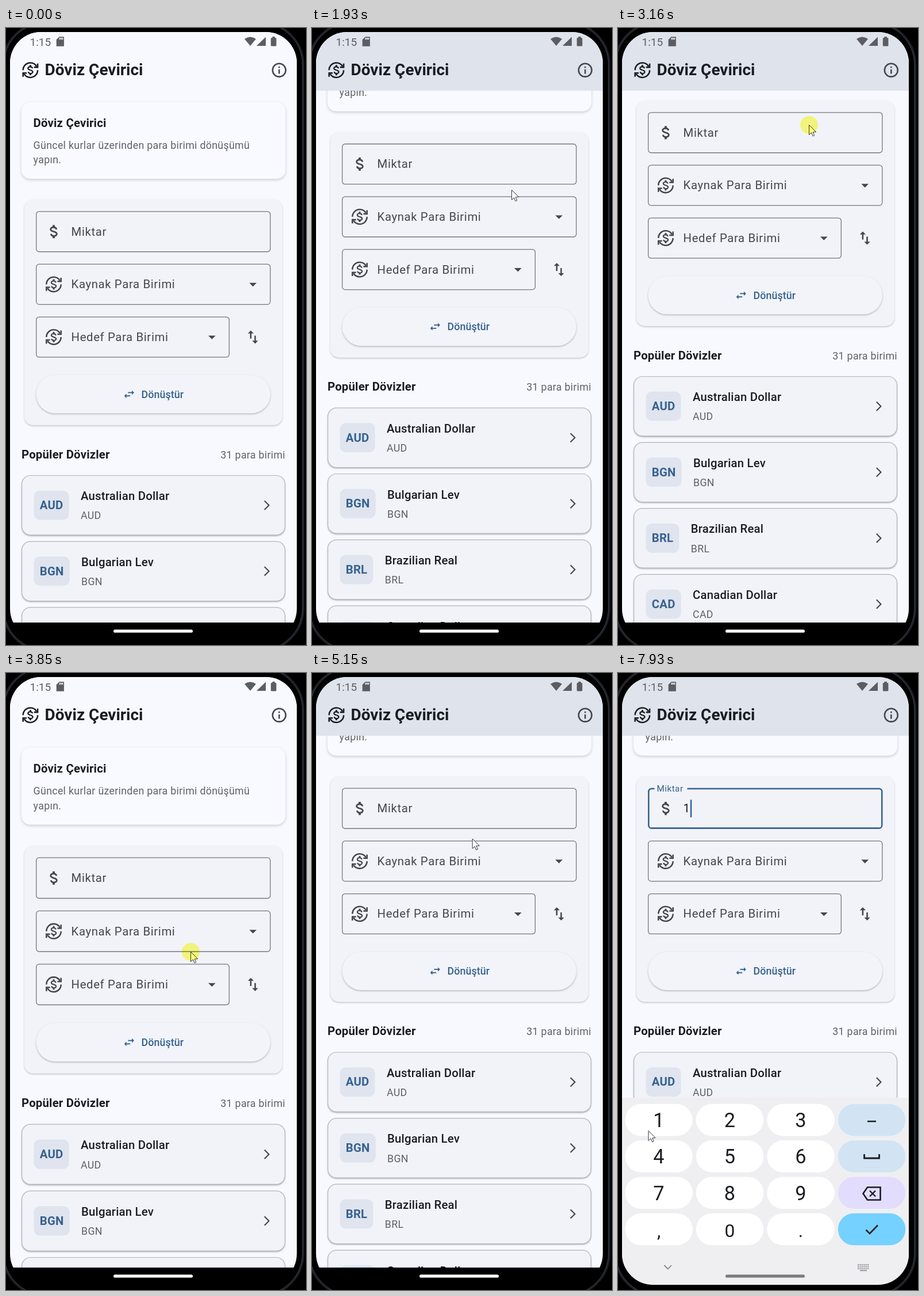
These frames come from a looping animation (522x1072 px, 8000 ms). An HTML page with a canvas:

```html
<!DOCTYPE html>
<html lang="tr">
<head>
<meta charset="utf-8">
<title>Döviz Çevirici</title>
<style>
html, body { margin: 0; width: 100%; height: 100%; overflow: hidden; background: #000; }
canvas { display: block; width: 522px; height: 1072px; }
</style>
</head>
<body>
<canvas id="stage"></canvas>
<script>
const W = 522, H = 1072, LOOP = 8000, DP = 1.2707;
const canvas = document.getElementById('stage');
const ctx = canvas.getContext('2d');
const ratio = window.devicePixelRatio || 1;
canvas.width = W * ratio;
canvas.height = H * ratio;

const INK = '#191c20', SOFT = '#43474e', GREY = '#5f6166', PRIMARY = '#36618e';
const SURFACE = '#f8f9ff', PANEL = '#f1f3f8', BADGE = '#dfe4ee';

const CURRENCIES = [
  ['AUD', 'Australian Dollar'], ['BGN', 'Bulgarian Lev'],
  ['BRL', 'Brazilian Real'], ['CAD', 'Canadian Dollar']
];

const lerp = (a, b, p) => a + (b - a) * p;
const easeOut = p => 1 - (1 - p) ** 3;
const progress = (t, a, b) => easeOut(Math.min(1, Math.max(0, (t - a) / (b - a))));

// Rests at a value, then eases through moves of [begin, end, ...value].
const follow = (rest, ...moves) => t => moves.reduce((at, [begin, end, ...to]) =>
  at.map((v, i) => lerp(v, to[i], progress(t, begin, end))), rest);

const pointerAt = follow([32, 719],
  [450, 950, 410, 216], [950, 1200, 362, 430], [1250, 1700, 347, 281],
  [2070, 2400, 380, 355], [2400, 2880, 335, 203], [2900, 3160, 332, 168],
  [3330, 3850, 321, 484], [4430, 4950, 279, 288], [5150, 5590, 230, 217],
  [6650, 7060, 150, 560], [7240, 7930, 52.5, 795]);
const scrollAt = follow([0], [1270, 2110, 118.5], [2900, 3160, 172], [3330, 3640, 0], [4430, 5110, 118.5]);
const stretchAt = follow([0], [3640, 3850, .0098], [4000, 4200, 0]);
const tintAt = follow([0], [1250, 1450, 1], [3600, 3780, 0], [4440, 4640, 1]);

const TYPED = 7700;
const isPressed = t => t > 1200 && t < 1700 || t > 2860 && t < 4050 || t > 4430 && t < 4980 || t > 5560 && t < 6330;
const hasCaret = t => t > TYPED || t > 6070 && t < 7560 && (t - 6070) % 1000 < 570;

function mix(a, b, p) {
  const rgb = c => [1, 3, 5].map(i => parseInt(c.slice(i, i + 2), 16));
  const to = rgb(b);
  return `rgb(${rgb(a).map((v, i) => Math.round(lerp(v, to[i], p)))})`;
}

function line(points, color, width) {
  ctx.beginPath();
  points.forEach(([x, y]) => ctx.lineTo(x, y));
  ctx.strokeStyle = color;
  ctx.lineWidth = width;
  ctx.stroke();
}

function polygon(points, fill) {
  ctx.beginPath();
  points.forEach(([x, y]) => ctx.lineTo(x, y));
  ctx.closePath();
  ctx.fillStyle = fill;
  ctx.fill();
}

function box(x, y, w, h, r, { fill, stroke, width = 1.3, shadow, blur = 3, drop = 1.5 }) {
  ctx.beginPath();
  ctx.roundRect(x, y, w, h, r);
  if (fill) {
    ctx.save();
    if (shadow) {
      ctx.shadowColor = `rgba(0,0,0,${shadow})`;
      ctx.shadowBlur = blur * ratio;
      ctx.shadowOffsetY = drop * ratio;
    }
    ctx.fillStyle = fill;
    ctx.fill();
    ctx.restore();
  }
  if (stroke) {
    ctx.strokeStyle = stroke;
    ctx.lineWidth = width;
    ctx.stroke();
  }
}

// Text is centred on its capital height; sizes and spacing are in dp.
function text(s, x, y, size, { color = INK, weight = 400, space = 0, align = 'left' } = {}) {
  ctx.font = `${weight} ${size * DP}px Roboto, sans-serif`;
  ctx.letterSpacing = `${space * DP}px`;
  ctx.textAlign = align;
  ctx.fillStyle = color;
  ctx.fillText(s, x, y + size * DP * .355);
}

// Draws a shape and its half-turn copy.
function twice(shape) {
  for (let i = 0; i < 2; i++) {
    shape();
    ctx.rotate(Math.PI);
  }
}

// Icons are drawn around the origin on a 24-unit grid.
const ICONS = {
  dollar(color) {
    twice(() => {
      ctx.fillRect(-1.5, -9, 3, 3);
      ctx.beginPath();
      ctx.moveTo(3.7, -3);
      ctx.bezierCurveTo(3.3, -7, -4.2, -6.8, -4.2, -3.2);
      ctx.bezierCurveTo(-4.2, -1.1, -2, -.6, 0, 0);
      ctx.lineWidth = 2.2;
      ctx.stroke();
    });
  },
  exchange(color) {
    twice(() => {
      ctx.beginPath();
      ctx.arc(0, 0, 10, Math.PI, -.55);
      ctx.lineWidth = 2;
      ctx.stroke();
      line([[10, -9], [10, -4], [5, -4]], color, 2);
    });
    ctx.scale(.78, .78);
    ICONS.dollar(color);
  },
  swap(color) {
    twice(() => {
      ctx.fillRect(-4, -5.5, 2, 7.5);
      polygon([[-7, -5], [-3, -9], [1, -5]], color);
    });
  },
  swapAcross(color) {
    ctx.rotate(-Math.PI / 2);
    ICONS.swap(color);
  },
  drop(color) {
    polygon([[-5, -2], [0, 3], [5, -2]], color);
  },
  info(color) {
    ctx.beginPath();
    ctx.arc(0, 0, 9, 0, Math.PI * 2);
    ctx.lineWidth = 2;
    ctx.stroke();
    ctx.fillRect(-1, -5, 2, 2);
    ctx.fillRect(-1, -1, 2, 6);
  },
  chevron(color) {
    line([[-4.9, -9.1], [4.2, 0], [-4.9, 9.1]], color, 2.5);
  },
  sd(color) {
    polygon([[-2, -10], [8, -10], [8, 10], [-8, 10], [-8, -4]], color);
    ctx.fillStyle = SURFACE;
    for (let i = 0; i < 3; i++) ctx.fillRect(-2 + i * 3, -8, 2, 4);
  }
};

function drawIcon(name, cx, cy, color = SOFT, size = 24) {
  ctx.save();
  ctx.translate(cx, cy);
  ctx.scale(size * DP / 24, size * DP / 24);
  ctx.fillStyle = ctx.strokeStyle = color;
  ICONS[name](color);
  ctx.restore();
}

function drawBezel() {
  ctx.fillStyle = '#000';
  ctx.fillRect(0, 0, W, H);
  box(-5, -10, 522, 1092, 74, { stroke: '#1d2026', width: 4 });
  box(-4, -9, 520, 1090, 73, { stroke: '#363a42', width: 1 });
}

function outline(y, w, color, width) {
  box(52 + width / 2, y + width / 2, w - width, 71.2 - width, 5, { stroke: color, width });
}

function field(row, w, glyph, label) {
  const y = 318.2 + row * 91.6;
  outline(y, w, '#73777f', 1.3);
  drawIcon(glyph, 83, y + 35.6);
  if (label) text(label, 113.5, y + 35.25, 16, { color: SOFT, space: .5 });
}

function drawAmount(t) {
  const y = 318.2, p = progress(t, 6200, 6390);
  if (!p) {
    field(0, 408.5, 'dollar', 'Miktar');
  } else {
    outline(y, 408.5, mix('#73777f', PRIMARY, p), lerp(1.3, 2.54, p));
    ctx.fillStyle = PANEL;
    ctx.fillRect(lerp(91, 63.5, p), y - 2, 57 * p, 6);
    drawIcon('dollar', 83, y + 35.6);
    text('Miktar', lerp(113.5, 67.5, p), lerp(y + 35.25, y + 1, p), lerp(16, 12, p),
      { color: mix(SOFT, PRIMARY, p), space: lerp(.5, .375, p) });
    const typed = t >= TYPED;
    ctx.globalAlpha = typed ? 1 : p;
    text(typed ? '1' : '0.00', 113.5, y + 35.25, 16, { color: typed ? INK : SOFT, space: .5 });
    ctx.globalAlpha = 1;
  }
  if (hasCaret(t)) {
    ctx.fillStyle = PRIMARY;
    ctx.fillRect(t >= TYPED ? 125.8 : 113.5, y + 20.5, 2.5, 30.5);
  }
}

function drawForm(t) {
  box(32, 298, 449, 392, 15, { fill: PANEL, shadow: .22 });
  drawAmount(t);
  field(1, 408.5, 'exchange', 'Kaynak Para Birimi');
  field(2, 337, 'exchange', 'Hedef Para Birimi');
  drawIcon('drop', 429.7, 445.4);
  drawIcon('drop', 358.3, 537);
  drawIcon('swap', 429.7, 537);
  box(52.5, 603, 407.5, 66.5, 33, { fill: '#f2f4fa', shadow: .25 });
  drawIcon('swapAcross', 214.3, 636.3, PRIMARY, 18);
  text('Dönüştür', 235.5, 636.2, 14, { color: PRIMARY, weight: 500, space: .1 });
}

function drawCurrency([code, name], y) {
  const strong = { color: PRIMARY, weight: 700, space: .15 };
  box(27.6, y, 457.8, 103.4, 15, { fill: PANEL, stroke: '#b4b6bb', width: 1.2, shadow: .35 });
  ctx.font = `700 ${16 * DP}px Roboto, sans-serif`;
  ctx.letterSpacing = `${.15 * DP}px`;
  const w = ctx.measureText(code).width + 16 * DP;
  box(48.6, y + 26.2, w, 50.8, 10, { fill: BADGE });
  text(code, 48.6 + 8 * DP, y + 51.2, 16, strong);
  const x = 48.6 + w + 16 * DP;
  text(name, x, y + 35.55, 16, { weight: 500, space: .15 });
  text(code, x, y + 69.6, 14, { color: GREY, space: .25 });
  drawIcon('chevron', 453.9, y + 51.7, SOFT, 16);
}

function drawBody(t) {
  const note = { color: GREY, space: .25 }, heading = { weight: 700, space: .15 };
  ctx.save();
  ctx.beginPath();
  ctx.rect(7, 109, 499, 924);
  ctx.clip();
  ctx.translate(0, 109);
  ctx.scale(1, 1 + stretchAt(t)[0]);
  ctx.translate(0, -109 - scrollAt(t)[0]);
  box(27, 129, 459, 133, 15, { fill: '#f9faff', shadow: .18, blur: 5, drop: 2 });
  text('Döviz Çevirici', 47.6, 164.8, 16, heading);
  text('Güncel kurlar üzerinden para birimi dönüşümü', 47.6, 203.7, 14, note);
  text('yapın.', 47.6, 229.1, 14, note);
  drawForm(t);
  text('Popüler Dövizler', 27, 740.6, 16, heading);
  text('31 para birimi', 486, 741.3, 14, { ...note, align: 'right' });
  CURRENCIES.forEach((c, i) => drawCurrency(c, 777.5 + i * 114.6));
  ctx.restore();
}

function drawHeader(t) {
  const status = '#5b5d62';
  ctx.fillStyle = mix(SURFACE, '#dfe3ec', tintAt(t)[0]);
  ctx.fillRect(7, 7, 499, 102);
  text('1:15', 41.5, 24.3, 15, { color: status });
  drawIcon('sd', 94.3, 23.5, status, 15.6);
  ctx.fillStyle = status;
  ctx.beginPath();
  ctx.moveTo(425, 31);
  ctx.lineTo(415, 19);
  ctx.quadraticCurveTo(425, 12, 435, 19);
  ctx.fill();
  polygon([[436, 31], [452, 31], [452, 15.5]], status);
  box(460.8, 17, 9.6, 14.5, 1.5, { fill: status });
  ctx.fillRect(463.4, 15, 4.4, 3);
  drawIcon('exchange', 42.4, 73.2, INK);
  text('Döviz Çevirici', 67.6, 72.4, 22, { weight: 700 });
  drawIcon('info', 475.3, 73.2);
}

function drawKeyIcons() {
  const cx = 441.5;
  line([[cx - 7.5, 779], [cx + 7.5, 779]], INK, 2.6);
  line([[cx - 13, 836], [cx - 13, 843], [cx + 13, 843], [cx + 13, 836]], INK, 2.8);
  ctx.beginPath();
  ctx.moveTo(cx - 15, 904.5);
  ctx.lineTo(cx - 7.5, 893.5);
  ctx.lineTo(cx + 15, 893.5);
  ctx.lineTo(cx + 15, 915.5);
  ctx.lineTo(cx - 7.5, 915.5);
  ctx.closePath();
  ctx.lineWidth = 2.6;
  ctx.stroke();
  for (const d of [-5, 5]) line([[cx + 1.5 - d, 899.5], [cx + 1.5 + d, 909.5]], INK, 2.4);
  line([[cx - 10, 967.5], [cx - 3.5, 974], [cx + 10.5, 959.5]], INK, 2.6);
}

function drawKeyboard(t) {
  const p = progress(t, 6690, 7060);
  if (!p) return;
  ctx.save();
  ctx.translate(0, 334 * (1 - p));
  ctx.fillStyle = '#efeff2';
  ctx.fillRect(7, 738, 499, 340);
  const sides = ['#d2e4f4', '#d2e4f4', '#e3ddfd', '#75d1ff'];
  ['123', '456', '789', ',0.'].forEach((keys, row) => {
    const y = 748.8 + row * 63.3;
    [...keys, ''].forEach((key, col) => {
      const x = 12.3 + col * 123.5;
      box(x, y, 117.5, 55.6, 27.8, { fill: col === 3 ? sides[row] : '#fff' });
      text(key, x + 58.7, y + (row === 3 ? 30 : 28), row === 3 ? 25 : 27, { align: 'center' });
    });
  });
  drawKeyIcons();
  line([[80.5, 1029], [86.8, 1035.5], [93, 1029]], '#85868a', 1.8);
  if (t >= 7260) {
    ctx.fillStyle = '#97989c';
    for (let i = 0; i < 18; i++) ctx.fillRect(417 + i % 6 * 3.4, 1027 + Math.floor(i / 6) * 3.4, 2.2, 2.2);
    ctx.fillRect(421, 1037.2, 12, 2);
  }
  ctx.restore();
}

function drawPointer(t) {
  if (t < 450) return;
  const [x, y] = pointerAt(t);
  ctx.save();
  ctx.translate(x + .5, y + .5);
  polygon([[0, 0], [0, 17], [4, 13.3], [6.6, 19.3], [9.2, 18.2], [6.7, 12.4], [12.2, 12.2]], '#fff');
  ctx.strokeStyle = '#33353a';
  ctx.lineWidth = 1;
  ctx.stroke();
  if (isPressed(t)) {
    ctx.globalCompositeOperation = 'multiply';
    ctx.beginPath();
    ctx.arc(0, 0, 15.5, 0, Math.PI * 2);
    ctx.fillStyle = '#ffff7f';
    ctx.fill();
  }
  ctx.restore();
}

function draw(t) {
  ctx.setTransform(ratio, 0, 0, ratio, 0, 0);
  drawBezel();
  ctx.save();
  ctx.beginPath();
  ctx.roundRect(7, 7, 499, 1056, 54);
  ctx.clip();
  ctx.fillStyle = SURFACE;
  ctx.fillRect(7, 7, 499, 1026);
  drawBody(t);
  drawHeader(t);
  drawKeyboard(t);
  box(187, 1045.2, 138, 5.4, 2.7, { fill: t >= 7260 ? '#7c7c7f' : '#fff' });
  ctx.restore();
  drawPointer(t);
}

const start = performance.now();
function tick() {
  draw((performance.now() - start) % LOOP);
  requestAnimationFrame(tick);
}
tick();
</script>
</body>
</html>
```
